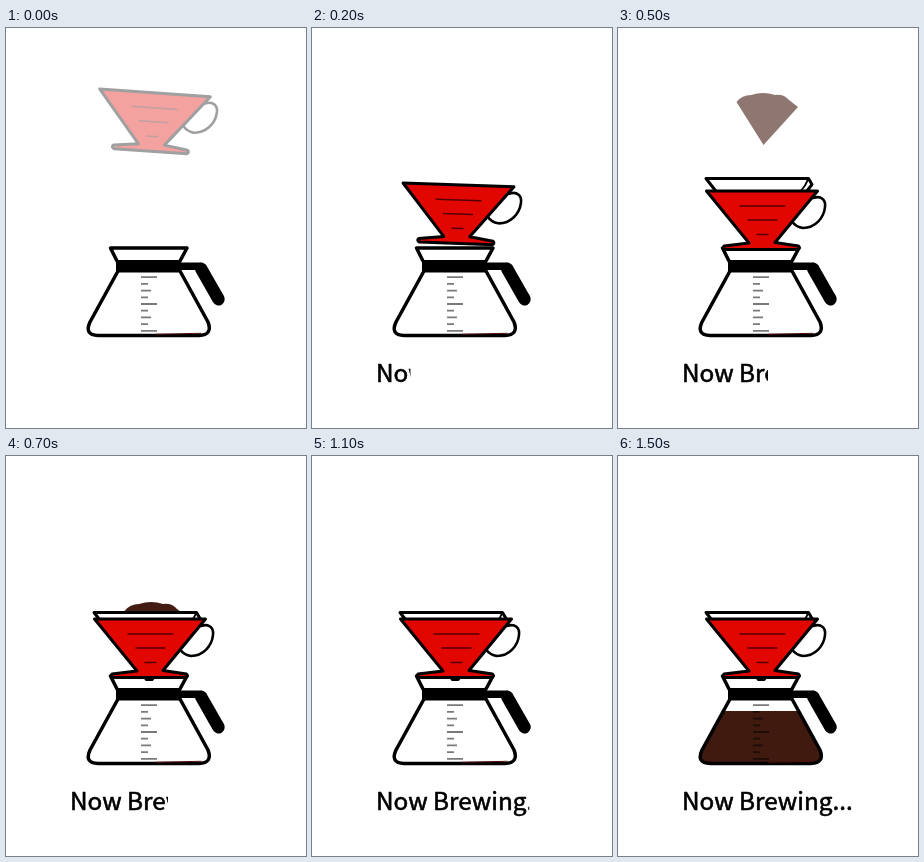
An HTML page for the animation above (1600 ms loop, 300 px wide and 400 px high).

```html
<!DOCTYPE html>
<html lang="en">
<head>
<meta charset="utf-8">
<title>Now Brewing</title>
<style>
  html, body { margin: 0; width: 100%; height: 100%; overflow: hidden; background: #fff; }
  svg { display: block; width: 100vw; height: 100vh; }
  text { font: 400 24.3px "Noto Sans CJK KR", "Noto Sans CJK JP", "Noto Sans CJK SC", sans-serif; }
</style>
</head>
<body>
<svg viewBox="0 0 300 400" fill="none" stroke="#000" stroke-width="3" stroke-linejoin="round" stroke-linecap="round">
  <defs>
    <clipPath id="reveal"><rect id="wipe" x="60" y="325" width="0" height="45"/></clipPath>
    <clipPath id="level"><rect id="surface" x="70" width="150" height="80"/></clipPath>
  </defs>

  <path id="coffee" fill="#40190f" stroke="none" clip-path="url(#level)"
    d="M112 243L84 294Q78 307 92 307.500H193Q207 307 202 294L174 243Z"/>
  <path id="ticks" stroke-opacity=".52" stroke-width="1.800" stroke-linecap="butt"/>
  <path stroke-width="3.500" d="M111 233L104.500 220H181L174 233M112 243L84 294Q78 307 92 307.500H193Q207 307 202 294L174 243"/>
  <path stroke="#500f0a" stroke-width="1" d="M150 306.300L195 305.300"/>
  <path fill="#000" stroke="none" d="M110 232H175V234.500H196L201 238L190 242H175V244.500H110Z"/>
  <path stroke-width="12.500" d="M195.300 241L212.500 271.200"/>

  <path id="grounds" fill="#431d13" stroke="none" d="M118.500 74Q124 67 133 67Q145 63 157 67Q166 66 171 72L180 79L145.500 117Z"/>

  <g id="filter">
    <path fill="#fff" d="M88 32H190.500L194 38L146 99H140.500Z"/>
    <path stroke-width="1.800" d="M190 33L187 39L142 98"/>
  </g>

  <g id="dripper">
    <path stroke-width="2.600" d="M195 170C203 167 208 172 207 179C206 190 197 200 185 200Q178 199 174.500 194"/>
    <path fill="#e10600" d="M88.500 163H199.500L157 214.500L180.500 218Q182.500 220 180 221.500H107Q104 220 106 218L131 215Z"/>
    <path stroke="#500" stroke-width="1.500" d="M122 178H167M130 192H159M139 206.500H150"/>
  </g>

  <text x="64" y="354" fill="#000" stroke-width=".6" clip-path="url(#reveal)">Now Brewing...</text>
</svg>
<script>
const LOOP = 1600, STEP = 100;
const $ = id => document.getElementById(id);

// Piecewise linear value through [step, value] keys, held at both ends.
function track(step, keys) {
  let [s0, v0] = keys[0];
  for (const [s1, v1] of keys) {
    if (step <= s1) return s1 === s0 ? v1 : v0 + (v1 - v0) * (step - s0) / (s1 - s0);
    [s0, v0] = [s1, v1];
  }
  return v0;
}

function place(id, transform, opacity) {
  $(id).setAttribute("transform", transform);
  $(id).setAttribute("opacity", opacity);
}

const tickLengths = [16, 7, 10, 7];
$("ticks").setAttribute("d", Array.from({ length: 9 },
  (_, i) => `M135 ${249.2 + i * 6.7}h${tickLengths[i % 4]}`).join(""));

function draw(step) {
  const dripY = track(step, [[0, -98], [1, -51], [2, -6], [3, 0]]);
  const dripX = track(step, [[1, 3], [3, 0]]);
  const tilt = track(step, [[1, 4], [3, 0]]);
  place("dripper", `translate(${dripX} ${dripY}) rotate(${tilt} 147 192)`, step < 1 ? .37 : 1);

  const filterY = track(step, [[3, 0], [4, 66], [5, 118.5], [6, 124.5]]);
  place("filter", `translate(0 ${filterY})`, step < 3 ? 0 : step < 4 ? .36 : 1);

  const groundsY = track(step, [[5, 0], [6, 7], [7, 81], [11, 96]]);
  place("grounds", `translate(0 ${groundsY})`, step < 5 ? 0 : step < 6 ? .6 : 1);

  $("surface").setAttribute("y", track(step, [[11, 308], [12, 293], [15, 255]]));
  $("wipe").setAttribute("width", track(step, [[0, 4], [5, 90], [7, 102], [12, 171], [13, 190]]));
}

function tick() {
  draw(Math.floor(performance.now() % LOOP / STEP));
  requestAnimationFrame(tick);
}
tick();
</script>
</body>
</html>
```
